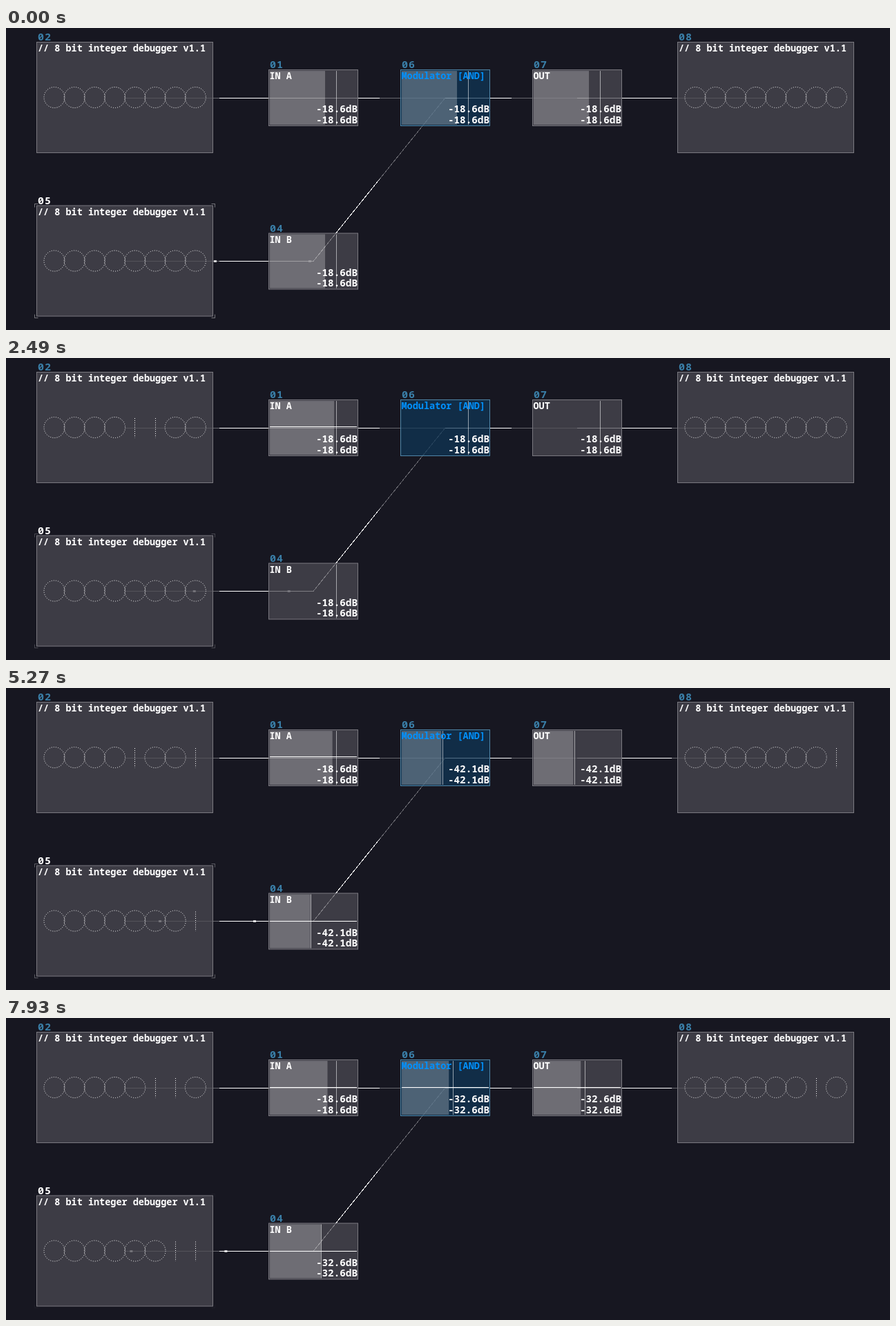
These frames come from a looping animation (1280 px wide and 437 px high, 8 s). An HTML page:

```html
<!DOCTYPE html>
<html lang="en">
<head>
<meta charset="utf-8">
<title>AND modulator patch</title>
<style>
html, body { margin: 0; width: 100%; height: 100%; overflow: hidden; background: #171721; }
svg { display: block; width: 1280px; height: 437px; }
text { font: 600 13.5px "Noto Sans Mono", "DejaVu Sans Mono", monospace; fill: #fff; white-space: pre; }
.id { font-size: 15px; letter-spacing: 1px; fill: #3a7fa8; }
.db { font-size: 14.3px; text-anchor: end; }
.crisp { shape-rendering: crispEdges; }
.dots { fill: none; stroke: #fff; stroke-dasharray: 1 2.14; }
</style>
</head>
<body>
<svg id="stage" viewBox="0 0 1280 437"></svg>
<script>
const LOOP = 8000, STEP = 201.5, HOLD = 3180, FALL = 0.2, LAG = 75;
const TOP = 101, LOW = 337.5;

// Each cycle counts A from 0 to 15 while B stays fixed.
const cycles = [[-3390, 15], [-80, 0], [3250, 1], [6540, 3], [9850, 7]];
const steps = [];
cycles.slice(0, -1).forEach(([start, b], k) => {
  for (let a = 0; a < 16; a++) {
    const end = a < 15 ? start + (a + 1) * STEP : cycles[k + 1][0];
    steps.push({ start: start + a * STEP, end, a, b, out: a & b });
  }
});

const decibels = v => 20 * Math.log10(2 * v / 255);
const meterWidth = v => v ? 128 * (1 + decibels(v) / 80) : 0;
const stepAt = t => steps.find(s => t < s.end);

function barAt(key, t) {
  let w = 0;
  for (const s of steps) {
    if (s.start > t) break;
    w = Math.max(w, meterWidth(s[key]) - FALL * Math.max(0, t - s.end));
  }
  return w;
}

// A held peak lapses to the current value after HOLD ms.
function peakAt(key, t) {
  let peak = 0, since = -Infinity;
  for (const s of steps) {
    if (s.start > t) break;
    if (s[key] > peak) { peak = s[key]; since = s.start; }
    if (since + HOLD < Math.min(s.end, t)) { peak = s[key]; since += HOLD; }
  }
  return peak;
}

const stage = document.getElementById('stage');

function add(tag, attrs, text) {
  const el = document.createElementNS('http://www.w3.org/2000/svg', tag);
  set(el, attrs);
  if (text) el.textContent = text;
  return stage.appendChild(el);
}
function set(el, attrs) {
  for (const k in attrs) el.setAttribute(k, attrs[k]);
}
const show = (el, on) => el.style.display = on ? '' : 'none';

// Links are bright from their source to the middle, dim beyond it.
function link(x1, y1, x2, y2) {
  const mx = (x1 + x2) / 2, my = (y1 + y2) / 2;
  const half = (a, b, c, d, opacity) =>
    add('line', { x1: a, y1: b, x2: c, y2: d, stroke: '#fff', 'stroke-opacity': opacity, class: 'crisp' });
  half(x1, y1, mx, my, 1);
  half(mx, my, x2, y2, 0.35);
}

function frame(x, y, w, h, fill, border) {
  add('rect', { x: x + 0.5, y: y + 0.5, width: w - 1, height: h - 1, fill, 'fill-opacity': 0.72, stroke: border });
}

function debuggerBox(id, x, y, key, selected) {
  frame(x, y, 256, 161, '#4d4c54', '#7a7980');
  const label = add('text', { x: x + 2, y: y - 2, class: 'id' }, id);
  if (selected) label.style.fill = '#fff';
  add('text', { x: x + 2, y: y + 14 }, '// 8 bit integer debugger v1.1');
  const bits = [];
  for (let i = 0; i < 8; i++) {
    const cx = x + 26 + i * 29.2, cy = y + 80.5, px = Math.floor(cx) + 0.5;
    bits.push([
      add('circle', { cx, cy, r: 15, class: 'dots' }),
      add('line', { x1: px, y1: cy - 13.5, x2: px, y2: cy + 15, class: 'dots' })
    ]);
  }
  return t => {
    const value = stepAt(t - LAG)[key];
    bits.forEach(([zero, one], i) => {
      const on = value >> (7 - i) & 1;
      show(zero, !on);
      show(one, on);
    });
  };
}

function meterBox(id, title, x, y, key, blue) {
  frame(x, y, 130, 82, blue ? '#103756' : '#4d4c54', blue ? '#4f86a8' : '#7a7980');
  const bar = add('rect', { x: x + 2, y: y + 2, height: 78, fill: '#fff', 'fill-opacity': 0.25 });
  const tick = add('rect', { y: y + 2, width: 1, height: 78, fill: '#fff', 'fill-opacity': 0.55 });
  const scope = add('rect', { x: x + 2, width: 126, height: 1, fill: '#fff' });
  add('text', { x: x + 2, y: y - 2, class: 'id' }, id);
  const name = add('text', { x: x + 1.5, y: y + 14 }, title);
  if (blue) name.style.fill = '#0091ff';
  const readings = [62, 77.5].map(dy => add('text', { x: x + 129, y: y + dy, class: 'db' }));
  return t => {
    const value = stepAt(t)[key], peak = peakAt(key, t);
    set(bar, { width: Math.max(0, barAt(key, t) - 2) });
    set(tick, { x: x + Math.round(meterWidth(peak)) });
    set(scope, { y: Math.round(y + 40.6 - value * 40 / 255) });
    show(tick, peak);
    show(scope, value);
    readings.forEach(r => {
      r.textContent = peak ? decibels(peak).toFixed(1) + 'dB' : '';
    });
  };
}

function packets() {
  const span = 137;
  const marks = [0, 1].map(() => add('rect', { y: LOW - 1.5, width: 4, height: 3, fill: '#fff', 'fill-opacity': 0.8 }));
  return t => {
    const p = ((131 - span * t / 2040) % span + span) % span;
    marks.forEach((m, i) => set(m, { x: 170 + p + i * span }));
  };
}

function brackets(x1, y1, x2, y2) {
  const corner = (x, y, dx, dy) => `M${x + dx} ${y}H${x}V${y + dy}`;
  const path = add('path', {
    d: corner(x1, y1, 5, 5) + corner(x2, y1, -5, 5) + corner(x1, y2, 5, -5) + corner(x2, y2, -5, -5),
    fill: 'none', stroke: '#fff'
  });
  return t => set(path, { 'stroke-opacity': 0.4 * (1 - t % 1000 / 1000) });
}

link(445, TOP, 172, TOP);
link(445, LOW, 172, LOW);
link(445, TOP, 636, TOP);
link(445, LOW, 636, TOP);
link(636, TOP, 827, TOP);
link(827, TOP, 1100, TOP);

const parts = [
  packets(),
  debuggerBox('02', 44, 20, 'a'),
  debuggerBox('05', 44, 256.5, 'b', true),
  debuggerBox('08', 972, 20, 'out'),
  meterBox('01', 'IN A', 380, 60, 'a'),
  meterBox('04', 'IN B', 380, 296.5, 'b'),
  meterBox('06', 'Modulator [AND]', 571, 60, 'out', true),
  meterBox('07', 'OUT', 762, 60, 'out'),
  brackets(41.5, 254.5, 302.5, 419.5)
];

const origin = performance.now();
function tick(now) {
  const t = Math.max(0, now - origin) % LOOP;
  parts.forEach(update => update(t));
  requestAnimationFrame(tick);
}
tick(origin);
</script>
</body>
</html>
```
